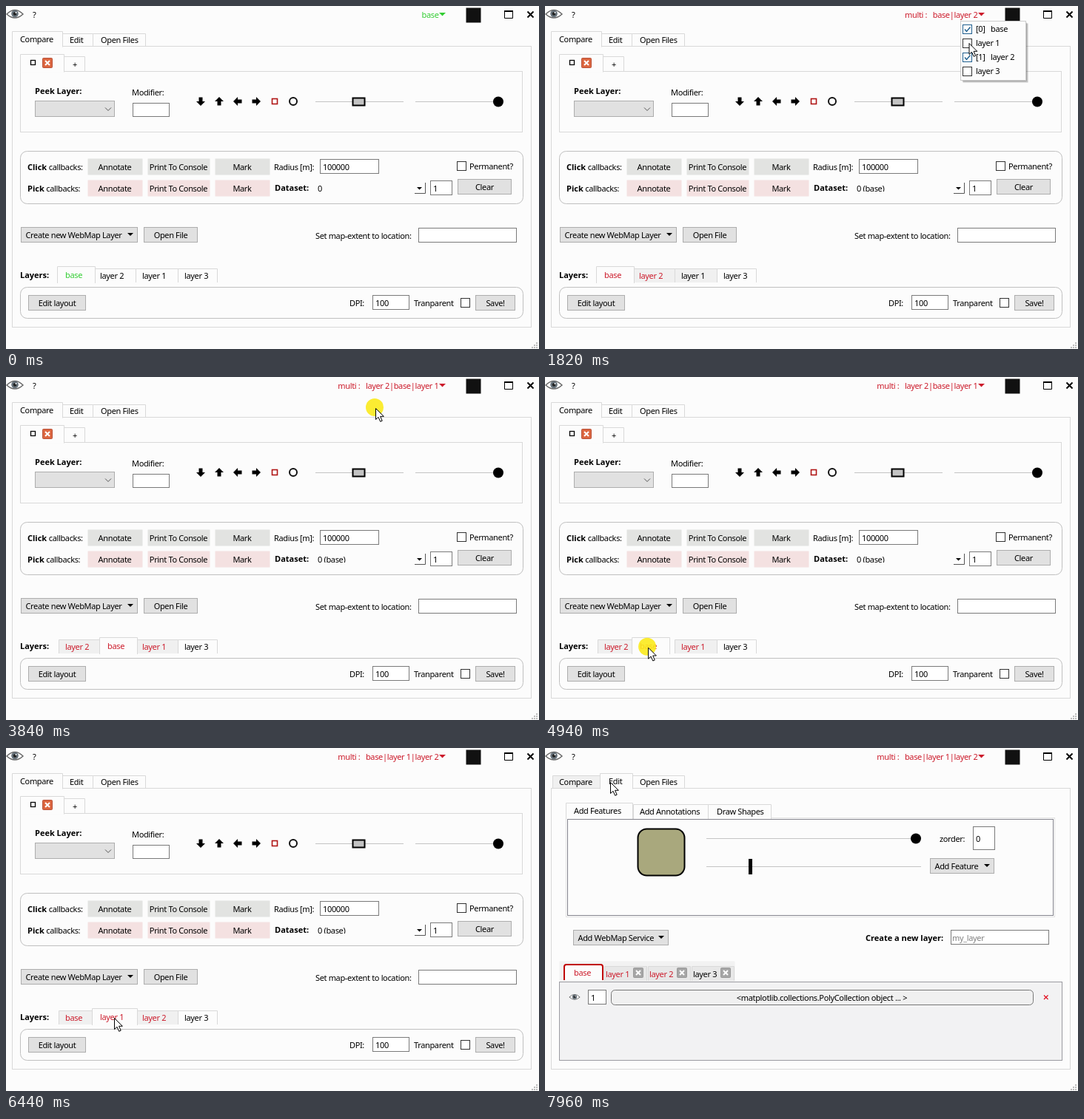
Write an HTML page that moves like this. It is 720 by 464 pixels and loops after 8000 ms.

```html
<!DOCTYPE html>
<html lang="en">
<head>
<meta charset="utf-8">
<title>Layer window</title>
<style>
html, body { margin: 0; width: 100%; height: 100%; overflow: hidden; background: #fcfcfc; }
svg { display: block; width: 720px; height: 464px; }
text { font: 11px "Noto Sans", "Open Sans", sans-serif; letter-spacing: -.35px; white-space: pre; }
text .b, text.b { font-weight: 700; letter-spacing: 0; }
</style>
</head>
<body>
<svg id="stage" viewBox="0 0 720 464" xmlns="http://www.w3.org/2000/svg">
  <rect width="720" height="464" fill="#fcfcfc"/>
  <g id="chrome"></g>
  <g id="compare"></g>
  <g id="edit"></g>
  <g id="live"></g>
</svg>
<script>
const LOOP = 8000, EDIT_AT = 7860;
const GREEN = '#32cd32', RED = '#cc1b2b', LINE = '#d9d9d9', GREY = '#e1e1e1';
const NAMES = ['base', 'layer 1', 'layer 2', 'layer 3'];
const $ = id => document.getElementById(id);

// drawing helpers: boxes are given by their left, top, right and bottom pixel edges
const rect = (l, t, r, b, fill = 'none', stroke = 'none', extra = '') =>
  `<rect x="${l + .5}" y="${t + .5}" width="${r - l - 1}" height="${b - t - 1}" fill="${fill}" stroke="${stroke}" ${extra}/>`;
const path = (d, stroke = '#000', width = 1, fill = 'none') =>
  `<path d="${d}" fill="${fill}" stroke="${stroke}" stroke-width="${width}"/>`;
const shape = (d, fill = '#000') => `<path d="${d}" fill="${fill}"/>`;
const dot = (x, y, r, fill = '#000', extra = '') => `<circle cx="${x}" cy="${y}" r="${r}" fill="${fill}" ${extra}/>`;
const label = (x, y, s, fill = '#000', extra = '') => `<text x="${x}" y="${y}" fill="${fill}" ${extra}>${s}</text>`;
const bold = (x, y, s) => label(x, y, s, '#000', 'class="b"');
const mid = (x, y, s, fill) => label(x, y, s, fill, 'text-anchor="middle"');
const input = (l, t, r, b, s = '', fill = '#000') =>
  rect(l, t, r, b, '#fff', '#7a7a7a') + label(l + 4, (t + b) / 2 + 4.5, s, fill);
const button = (l, t, r, b, s) => rect(l, t, r, b, GREY, '#adadad') + mid((l + r) / 2, (t + b) / 2 + 4, s);
const down = (x, y, fill = '#000', w = 8) => shape(`M${x} ${y}h${w}l${-w / 2} ${w / 2}z`, fill);
const menuButton = (l, t, r, b, s) =>
  rect(l, t, r, b, GREY, '#adadad') + label(l + 6.5, t + 15, s) + down(r - 14, t + 8);
const check = (x, y, on = false, stroke = '#333') => rect(x, y, x + 13, y + 13, '#fff', stroke) +
  (on ? path(`M${x + 3} ${y + 6.5}l2.5 3 5-6`, stroke, 1.4) : '');
const tab = (l, t, r, b, fill = '#fcfcfc') => path(`M${l + .5} ${b}V${t + .5}H${r + .5}V${b}`, LINE, 1, fill);
const eye = (x, y, s) => `<g transform="translate(${x} ${y}) scale(${s})">` +
  path('M-11 0Q0 -11 11 0Q0 10 -11 0z', '#666', 1.4, '#fff') +
  dot(0, -.5, 4.8, '#66717a') + dot(0, -.5, 2.2, '#222') + dot(1.5, -2, 1, '#fff') + '</g>';

function chromeArt() {
  let grip = '';
  for (let i = 0; i < 3; i++)
    for (let j = 0; j <= i; j++)
      grip += rect(716 - 3 * j, 455 + 3 * i, 718 - 3 * j, 457 + 3 * i, '#bbb', '#bbb');
  return eye(12, 11, 1) + label(36, 16, '?') + rect(621, 2, 642, 23, '#111') +
    path('M673.5 7V16.5H684.5V7', '#000') + path('M673 7H685', '#000', 2) +
    path('M704.5 7.5l8 8m0-8l-8 8', '#000', 2) + grip +
    rect(8, 54, 710, 435, '#fcfcfc', LINE);
}

function compareArt() {
  const arrow = (x, turn) => `<g transform="translate(${x} 129) rotate(${turn})">` +
    shape('M-2.5 -5.5h5V0H6L0 6L-6 0h3.5z') + '</g>';
  return rect(19, 88, 698, 171, '#fcfcfc', LINE) + tab(78, 68, 106, 88) + tab(19, 65, 78, 89.5) +
    rect(33, 73, 40, 80, '#fff', '#000', 'stroke-width="1.3"') +
    rect(49, 70, 63, 84, '#dc6640', '#b9523a', 'rx="1"') + path('M53 74l6 6m0-6l-6 6', '#fff', 2) +
    mid(93, 83, '+') +
    bold(39, 119, 'Peek Layer:') + rect(39, 128, 147, 150, GREY, '#adadad') +
    path('M134 137.5l4 4 4-4', '#555') +
    label(170, 121, 'Modifier:') + input(171, 131, 221, 150) +
    arrow(263, 0) + arrow(288, 180) + arrow(313, 90) + arrow(338, 270) +
    rect(359, 125, 367, 133, '#fff', '#b01515', 'stroke-width="1.6"') +
    dot(388, 129, 5, '#fff', 'stroke="#111" stroke-width="2"') +
    path('M418 129.5H537M553 129.5H665', '#c4c4c4') +
    rect(468, 124, 485, 135, '#c3c3c3', '#000', 'stroke-width="2"') + dot(665, 129.5, 7) +
    rect(19, 196, 699, 268, '#fcfcfc', '#c0c0c0', 'rx="9"') +
    label(29, 222, '<tspan class="b">Click</tspan> callbacks:') +
    rect(110, 206, 185, 229, '#e2e3e1') + rect(191, 206, 276, 229, '#e2e3e1') + rect(282, 206, 357, 229, '#e2e3e1') +
    mid(147, 222, 'Annotate') + mid(233, 222, 'Print To Console') + mid(319, 222, 'Mark') +
    label(362, 222, 'Radius [m]:') + input(424, 207, 504, 227, '100000') +
    check(609, 210) + label(626, 221, 'Permanent?') +
    bold(363, 250, 'Dataset:') + input(573, 236, 603, 256, '1') + button(610, 234, 683, 255, 'Clear') +
    menuButton(20, 299, 178, 320, 'Create new WebMap Layer') + button(186, 299, 259, 320, 'Open File') +
    label(418, 315, 'Set map-extent to location:') + input(557, 300, 690, 320) +
    bold(19, 368, 'Layers:') +
    rect(19, 380, 699, 423, '#fcfcfc', '#c0c0c0', 'rx="9"') +
    button(30, 391, 108, 412, 'Edit layout') + label(464, 406, 'DPI:') + input(495, 391, 545, 411, '100') +
    label(551, 406, 'Tranparent') + check(614, 395) + button(634, 391, 688, 412, 'Save!');
}

function editArt() {
  const layerTab = (x, s, fill) => tab(x - 2, 295, x + 55, 315, '#e8e8e8') + label(x, 310, s, fill) +
    rect(x + 37, 297, x + 51, 311, '#a6a6a6', '#999', 'rx="1"') +
    path(`M${x + 41} 301l6 6m0-6l-6 6`, '#fff', 2);
  return rect(28, 94, 689, 229, 'none', '#e2e2e2') +
    tab(119, 76, 220, 96) + tab(220, 76, 305, 96) + rect(30, 96, 687, 227, '#fcfcfc', '#85858e') +
    tab(28, 74, 118, 96) +
    label(39, 89, 'Add Features') + label(128, 90, 'Add Annotations') + label(232, 90, 'Draw Shapes') +
    rect(125, 109, 189, 173, '#a9a87d', '#000', 'rx="12" stroke-width="2"') +
    path('M218 122.5H501M218 160.5H508', '#c4c4c4') + dot(501, 122.5, 7) + rect(275, 150, 280, 171, '#000', '#000') +
    label(533, 127, 'zorder:') + input(578, 106, 608, 138, '0') +
    menuButton(520, 149, 607, 170, 'Add Feature') + menuButton(38, 246, 167, 267, 'Add WebMap Service') +
    bold(433, 261, 'Create a new layer:') + input(548, 246, 681, 266) + label(550, 261, 'my_layer', '#808080') +
    rect(19, 288, 257, 316, '#f2f2f2') +
    layerTab(82, 'layer 1', RED) + layerTab(141, 'layer 2', RED) + layerTab(200, 'layer 3', '#000') +
    rect(19, 316, 699, 423, '#f2f2f3', '#9a9aa0') +
    path('M26 314V296q0-3 3-3H75q3 0 3 3V314', '#c00000', 2, '#fcfcfc') + label(39, 308, 'base', RED) +
    eye(40, 337, .65) + input(58, 327, 83, 347, '1') +
    rect(89, 327, 660, 348, '#f0f0f0', '#777', 'rx="5"') +
    mid(374, 342, '&lt;matplotlib.collections.PolyCollection object ... &gt;') +
    path('M674 334.5l5.5 5.5m0-5.5l-5.5 5.5', '#e01020', 1.2);
}

// time, visible layers, tab order, current tab (digits index NAMES)
const STATES = [
  [0, '0', '0213', 0], [1620, '02', '0213', 0], [2020, '2', '2103', 0], [2740, '20', '2013', 0],
  [3240, '201', '2013', 0], [5140, '021', '0213', 0], [5740, '021', '0213', 1], [6140, '012', '0123', 1]
];
// time, tip x, tip y
const MOUSE = [
  [200, 646, 214], [820, 580, 20], [920, 579, 17], [1220, 579, 17], [1520, 573, 69], [1720, 573, 69],
  [1920, 572, 31], [2220, 572, 31], [2420, 574, 42], [2520, 574, 41], [2720, 573, 32], [2840, 573, 32],
  [3140, 572, 50], [3340, 572, 50], [3640, 540, 58], [3840, 499, 42], [3940, 499, 42], [4140, 442, 105],
  [4440, 200, 327], [4640, 140, 384], [4740, 148, 366], [4840, 148, 366], [5240, 91, 364], [5340, 91, 364],
  [5640, 203, 363], [5840, 203, 363], [6340, 146, 365], [6540, 146, 365], [6640, 160, 367],
  [7060, 107, 106], [7260, 88, 46]
];
const PRESSES = [[920, 1220], [1620, 1720], [2020, 2120], [2740, 2840], [3240, 3340], [3840, 3940], [4740, 5240], [5740, 6340]];
// start, end, tab text x and pointer x at the start
const DRAGS = [[4840, 5240, 137, 148], [5840, 6340, 184, 203]];
const within = (t, [a, b]) => t >= a && t < b;

function mouseAt(t) {
  const i = MOUSE.findIndex(k => k[0] > t);
  if (i < 0) return MOUSE[MOUSE.length - 1].slice(1);
  if (i === 0) return MOUSE[0].slice(1);
  const [a, x, y] = MOUSE[i - 1], [b, u, v] = MOUSE[i];
  const p = (t - a) / (b - a), e = p * p * (3 - 2 * p);
  return [x + (u - x) * e, y + (v - y) * e];
}

function topTabs(t) {
  const edit = t >= EDIT_AT;
  const hover = t >= 7160 ? '#d8eaf9' : '#fcfcfc';
  const all = [[8, 76, 'Compare', 19], [76, 117, 'Edit', 86], [117, 188, 'Open Files', 128]];
  const draw = ([l, r, s, x], on, fill) =>
    (on ? tab(l, 34, r, 55.5) : tab(l, 37, r, 54, fill)) + label(x, on ? 49 : 50, s);
  if (edit) return draw([10, 74, 'Compare', 19], false, '#f0f0f0') + draw(all[2], false) + draw([74, 118, 'Edit', 86], true);
  return draw(all[1], false, hover) + draw(all[2], false) + draw(all[0], true);
}

function layerTabs(t, [, vis, order, cur], mx) {
  const tone = vis.length > 1 ? RED : GREEN;
  let x = 80, out = '', top = '';
  for (const d of order) {
    const on = +d === cur, w = d === '0' ? 47 : 57, fill = vis.includes(d) ? tone : '#000';
    const drag = on && DRAGS.find(g => within(t, g));
    const tx = drag ? Math.max(80, drag[2] + mx - drag[3]) : x;
    const l = tx - 9, r = Math.min(l + w, 285);
    if (on) top = tab(l - 2, 352, r + 2, 375) + label(tx, 368, NAMES[d], fill);
    else out += tab(l, 355, r, 374, t >= 1620 && d !== '3' ? '#f0f0f0' : '#fcfcfc') + label(tx, 369, NAMES[d], fill);
    x += d === '3' ? 55 : w;
  }
  return out + top;
}

function pickRow(t, vis) {
  const off = !vis.includes('0'), ink = off ? '#888' : '#000', pink = '#f4e1e1';
  const data = off ? '' : t < 1620 ? '0' : '0 (base)';
  return label(29, 251, '<tspan class="b">Pick</tspan> callbacks:', ink) +
    rect(110, 235, 185, 258, pink) + rect(191, 235, 276, 258, pink) + rect(282, 235, 357, 258, pink) +
    mid(147, 251, 'Annotate', ink) + mid(233, 251, 'Print To Console', ink) + mid(319, 251, 'Mark', ink) +
    label(421, 251, data) + rect(420, 251, 545, 256, '#fcfcfc', '#fcfcfc') +
    path('M552 253.5H566.5V239', '#555') + down(555, 245, off ? '#999' : '#000', 7);
}

function menu(t, vis, my) {
  const r = vis === '0' ? 653 : 650;
  let out = rect(564, 23, r + 3, 104, '#000', 'none', 'opacity=".22"') +
    rect(563, 22, r + 1, 102, '#000', 'none', 'opacity=".3"') + rect(561, 20, r, 101, '#fcfcfc', '#ccc');
  NAMES.forEach((s, i) => {
    const y = 25 + 19 * i, n = vis.indexOf(i), hot = t > 1220 && my >= y + 13 - 19 * (i > 0) + 15 * (i > 0) && my < y + 17;
    out += check(564, y, n >= 0, hot || n >= 0 && t > 1220 ? '#1f5f8f' : '#333') +
      label(582, y + 10, n >= 0 ? `[${n}]` : s) + (n >= 0 ? label(602, y + 10, s) : '');
  });
  return `<g opacity="${t < 1120 ? .75 : 1}">${out}</g>`;
}

function title(vis) {
  const many = vis.length > 1, tone = many ? RED : GREEN;
  const s = (many ? 'multi :\u00a0\u00a0 ' : '') + [...vis].map(d => NAMES[d]).join('|');
  return label(584.5, 16, s, tone, 'text-anchor="end"') + down(585, 9, tone, 9);
}

function pointer(t, x, y) {
  const glow = PRESSES.some(p => within(t, p)) ? dot(x - 1, y - 1, 12, '#fbea1c', 'opacity=".9"') : '';
  return glow + `<g transform="translate(${x} ${y})">` +
    path('M.5 .5V15.5L4 12.3L6.7 18.3L9.2 17.2L6.6 11.3H11.3z', '#000', 1, '#fff') + '</g>';
}

function stepTime(t) {
  const shift = t < 900 ? 0 : t < 2900 ? 20 : t < 6700 ? 40 : 60;
  return t - (t - shift) % 100;
}

function render(t) {
  const state = STATES.filter(s => s[0] <= t).pop(), vis = state[1];
  const [mx, my] = mouseAt(t), edit = t >= EDIT_AT;
  $('compare').style.display = edit ? 'none' : '';
  $('edit').style.display = edit ? '' : 'none';
  $('live').innerHTML = topTabs(t) + title(vis) +
    (edit ? '' : pickRow(t, vis) + layerTabs(t, state, mx)) +
    (within(t, [1020, 3840]) ? menu(t, vis, my) : '') +
    (t >= 200 ? pointer(t, mx, my) : '');
}

$('chrome').innerHTML = chromeArt();
$('compare').innerHTML = compareArt();
$('edit').innerHTML = editArt();

let shown = -1;
function tick() {
  const t = stepTime(Math.floor(performance.now() % LOOP));
  if (t !== shown) render(shown = t);
  requestAnimationFrame(tick);
}
tick();
</script>
</body>
</html>
```
